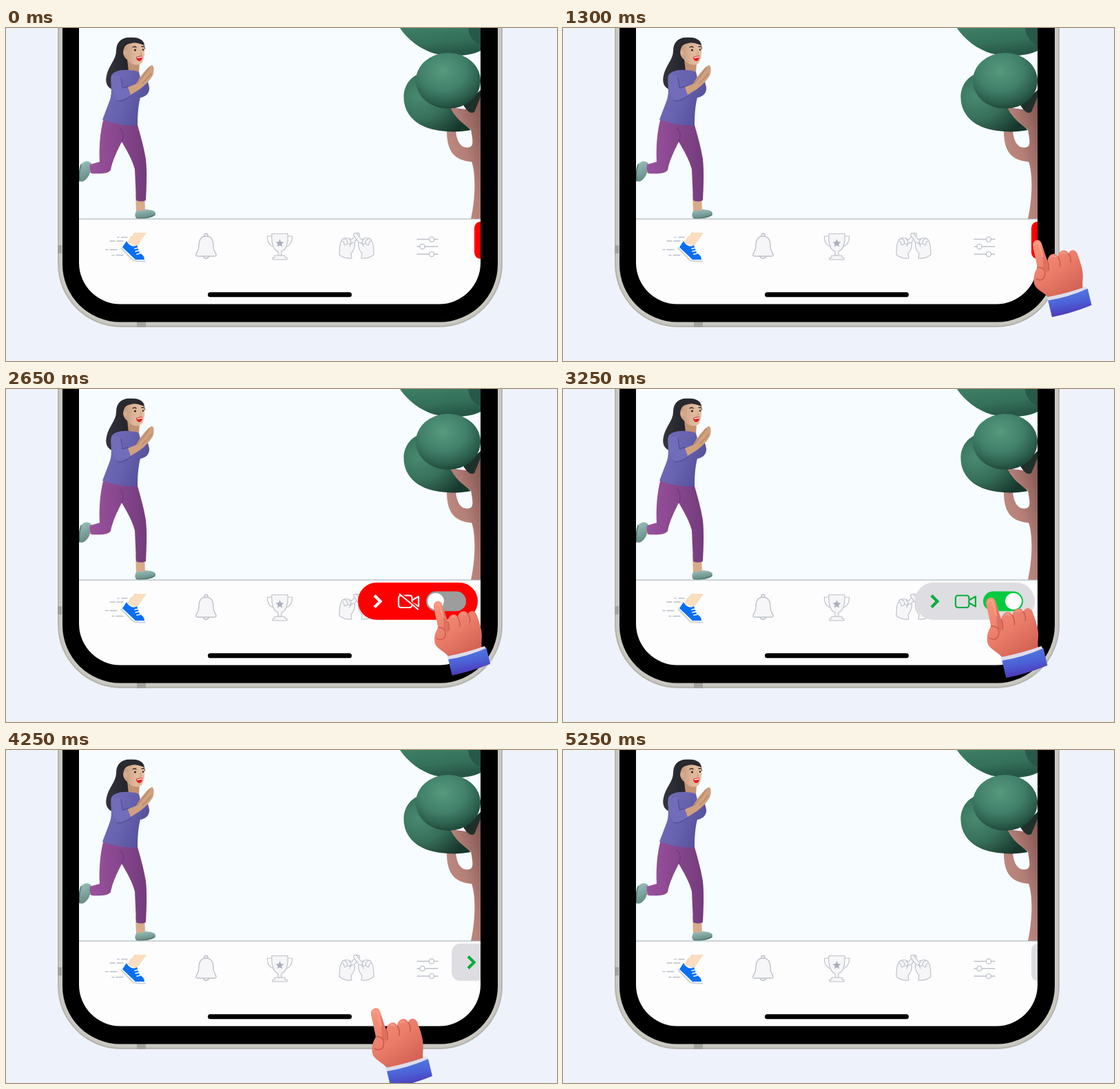
Write an HTML page that moves like this. It is 800 px wide and 483 px high and loops after 5.3 s.

```html
<!DOCTYPE html>
<html lang="en">
<head>
<meta charset="utf-8">
<title>Camera panel</title>
<style>
  html, body { margin: 0; width: 100%; height: 100%; overflow: hidden; background: #eef3fb; }
  svg { display: block; width: 800px; height: 483px; }
  .line { fill: none; stroke-linecap: round; stroke-linejoin: round; }
  .icon { fill: #f6f6f8; stroke: #bfc2ca; stroke-width: 1.4; stroke-linecap: round; stroke-linejoin: round; }
</style>
</head>
<body>
<svg viewBox="0 0 800 483">
  <defs>
    <clipPath id="screen"><path d="M106 0H689V341A60 60 0 0 1 629 400.500H166A60 60 0 0 1 106 341Z"/></clipPath>
    <radialGradient id="leaf" cx=".42" cy=".32" r=".72">
      <stop stop-color="#569a7e"/><stop offset=".5" stop-color="#41806a"/><stop offset=".8" stop-color="#2c5e4c"/><stop offset="1" stop-color="#1b4034"/>
    </radialGradient>
    <radialGradient id="backLeaf" cx=".22" cy=".4" r=".8">
      <stop stop-color="#488a70"/><stop offset=".5" stop-color="#376f5a"/><stop offset="1" stop-color="#17362c"/>
    </radialGradient>
    <linearGradient id="crown" x2=".35" y2="1">
      <stop stop-color="#3f7f66"/><stop offset=".6" stop-color="#34705a"/><stop offset="1" stop-color="#275747"/>
    </linearGradient>
    <linearGradient id="bark" x1="0" x2="1" y1="1" y2="0">
      <stop stop-color="#c6938a"/><stop offset=".55" stop-color="#b47f77"/><stop offset="1" stop-color="#80544f"/>
    </linearGradient>
    <linearGradient id="knit" x2="1" y2=".4">
      <stop stop-color="#736ebb"/><stop offset=".55" stop-color="#6863af"/><stop offset="1" stop-color="#56519c"/>
    </linearGradient>
    <linearGradient id="pants" x2="1">
      <stop stop-color="#9a529f"/><stop offset=".45" stop-color="#8a488f"/><stop offset="1" stop-color="#743c7c"/>
    </linearGradient>
    <linearGradient id="hair" x2="1">
      <stop stop-color="#34343d"/><stop offset=".5" stop-color="#25252c"/><stop offset="1" stop-color="#3c3b45"/>
    </linearGradient>
    <linearGradient id="face" x2="1">
      <stop stop-color="#c2977b"/><stop offset=".5" stop-color="#deb598"/><stop offset="1" stop-color="#e6c2a6"/>
    </linearGradient>
    <linearGradient id="mint" x2=".3" y2="1">
      <stop stop-color="#a0c2bd"/><stop offset="1" stop-color="#668c88"/>
    </linearGradient>
    <linearGradient id="skin" x1=".2" x2=".8" y2="1">
      <stop stop-color="#f6927b"/><stop offset=".5" stop-color="#ea7c69"/><stop offset="1" stop-color="#cf5d50"/>
    </linearGradient>
    <linearGradient id="sleeve" x1=".4" x2=".65" y2="1">
      <stop stop-color="#4f7fe0"/><stop offset=".5" stop-color="#4c5fd6"/><stop offset="1" stop-color="#4c2dae"/>
    </linearGradient>
  </defs>

  <!-- phone body -->
  <rect x="75" y="-200" width="646" height="634" rx="92" fill="#b6b6ae"/>
  <rect x="77" y="-200" width="642" height="631.500" rx="90" fill="#c9c9c1"/>
  <path d="M190 426h13v8h-13zM75 315h6v12h-6z" fill="#a3a39c"/>
  <rect x="82" y="-200" width="632" height="626.500" rx="84" fill="#000"/>

  <g clip-path="url(#screen)">
    <rect x="106" width="583" height="401" fill="#fdfdfe"/>
    <rect x="106" width="583" height="277" fill="#f6fcff"/>

    <!-- tree -->
    <path d="M640 149H653C655 170 664 175 673 173C680 171 677 160 675 147C666 141 655 133 644 115L668 118 689 100V277H675C682 245 682 210 676 194C650 192 640 178 640 149Z" fill="url(#bark)"/>
    <path d="M577.500 101C577 82 590 67 606 65L674 100C664 120 646 112 646 117C655 134 668 141 675 148C660 151 645 151 630 149C598 145 578 127 577.500 101Z" fill="url(#backLeaf)"/>
    <path d="M664 112C670 121 674 125 680 122L689 100V90Z" fill="#1f302a"/>
    <path d="M572 0C583 17 602 31 622 37C650 43 676 40 689 33V0Z" fill="url(#crown)"/>
    <path d="M671 0C672 12 679 21 689 25V0Z" fill="#28584a"/>
    <ellipse cx="642" cy="76.500" rx="47" ry="40.500" fill="url(#leaf)"/>

    <!-- runner -->
    <path d="M188 240 189 267 202 265 201 240Z" fill="#d8ab8b"/>
    <path d="M114 201 124 197 126 209 117 212Z" fill="#c99a7c"/>
    <path d="M109 198C113 192 121 192 124 197C120 203 124 210 119 216C115 222 109 225 107 221C106 214 106 205 109 198Z" fill="url(#mint)"/>
    <path d="M109 198C106 207 106 215 107 222" class="line" stroke="#4e7572" stroke-width="1.500"/>
    <path d="M188 268C190 262 197 267 203 263C209 264 218 264 217 270C215 275 204 277 190 276C187 275 187 271 188 268Z" fill="url(#mint)"/>
    <path d="M190 275.500Q205 277 216 271" class="line" stroke="#557c79" stroke-width="1.500"/>
    <path d="M142 130C136 152 135 176 136 194L122 198C121 202 122 208 124 211C137 212 149 211 152 206C154 193 162 177 168 165C175 177 183 190 187 205L189 250Q196 253 203 250C204 232 205 208 203 190C200 171 194 152 190 137Z" fill="url(#pants)"/>
    <path d="M168 165C172 157 170 149 165 145" class="line" stroke="#6a3275" stroke-width="1.500" opacity=".6"/>
    <path d="M183 14C169 12 160 20 160 33C160 46 149 54 146 69C143 81 149 89 158 90C168 85 178 74 180 58L202 30C201 20 194 14 183 14Z" fill="url(#hair)"/>
    <path d="M176 45 194 50 193 65 178 63Z" fill="#c29172"/>
    <path d="M173 26C178 21 192 20 200 24C202 32 202 43 197 51C191 56 181 53 176 46C170 42 168 34 173 26Z" fill="url(#face)"/>
    <path d="M166 35C169 23 176 19 185 20L201 25C200 17 192 13 181 14C167 15 163 27 164 41Z" fill="#292930"/>
    <ellipse cx="173.500" cy="36" rx="3" ry="4" fill="#d9a98a"/>
    <path d="M184 28q3-2 5 0M197 27l3 0" class="line" stroke="#3a2b28" stroke-width="1.300"/>
    <circle cx="187.500" cy="32" r="1.500" fill="#2a2023"/>
    <circle cx="199" cy="31.500" r="1.300" fill="#2a2023"/>
    <path d="M195 33l2 5-3 0" class="line" stroke="#c99376"/>
    <path d="M189 42Q194 40 198 40Q198 49 193 48Q189 47 189 42Z" fill="#e32127"/>
    <path d="M191 43l6-1" class="line" stroke="#fff" stroke-width="1.500"/>
    <path d="M178 61C166 60 156 63 153 69C151 80 155 92 151 104L140 133C154 138 174 143 191 141C191 127 192 112 195 101C203 100 209 94 208 86L206 78 199 81C195 76 195 70 193 64C188 61 184 62 178 61Z" fill="url(#knit)"/>
    <path d="M153 69C151 80 156 98 161 105C165 109 176 103 182 98L177 85 169 87 166 69Z" fill="#726dba"/>
    <path d="M167 72C168 79 169 83 169 87L177 85M161 105C167 108 176 102 182 98" class="line" stroke="#484488" stroke-width="1.300" opacity=".7"/>
    <path d="M177 86 189 81C194 71 204 58 211 54C216 53 215 65 213 69C208 77 202 83 194 89L181 97Z" fill="#cfa17f"/>
    <path d="M191 80C196 72 203 67 208 57M198 80q8-7 13-14" class="line" stroke="#b08062" stroke-width="1.200"/>

    <!-- tab bar -->
    <path d="M106 277H689" stroke="#9eaab0" stroke-width="1.100"/>
    <path d="M162 303.500h2M168 303.500h8M151 309h7M161 309h9M145 321.500h3M151 321.500h10M154 329.500h3M160 329.500h10" class="line" stroke="#b9c0c9" stroke-width="1.300"/>
    <path d="M187 297H204L190 317 176 311Z" fill="#fbddbf"/>
    <path d="M181 303l8-6h-2l-10 13z" fill="#f0c79f"/>
    <path d="M175 309C178 315 185 319 190 315L194 326Q201 330 201 336L188 336 169 318Z" fill="#096ff2"/>
    <path d="M167.500 319.500 184 336.500Q186 338.500 202 338.500" class="line" stroke="#cbd5df" stroke-width="2.200"/>
    <path d="M187 320l5-1M188 324l5-1M190 328l5-1" class="line" stroke="#fff" stroke-width="1.500"/>

    <g class="icon">
      <path d="M286 331Q290.500 338 295 331"/>
      <circle cx="290.500" cy="301" r="2.700"/>
      <path d="M290.500 302C282 302 280 309 280 316C280 323 277 325 276 328Q275 331 279 331H302Q306 331 305 328C304 325 301 323 301 316C301 309 299 302 290.500 302Z"/>
      <g stroke-width="1.200">
        <path d="M387 302H379.500C379 311 384 317 390 317M408 302H415.500C416 311 411 317 405 317" fill="none"/>
        <path d="M386 298.500H409C410 313 406 323 400 324V330H395V324C389 323 385 313 386 298.500Z"/>
        <path d="M390 330H405V333H408V336H387V333H390Z"/>
        <g id="fist">
          <path d="M484 329C484 321 484 313 487 309C488 304 497 303 502 307L509 298C512 296 514 299 513 301L506 311C508 318 503 325 501 327L502 334Q492 335 484 329Z"/>
          <path d="M488 309q3 1 3 5M492 306q4 1 4 6M498 306q3 2 3 6M491 314q2 2 5-2q2 3 5 0M505 311q-5 1-6 6" fill="none"/>
        </g>
        <use href="#fist" transform="translate(1018) scale(-1 1)"/>
      </g>
      <path d="M597 306.500H627M597 317H627M597 328H627"/>
      <g fill="#fff"><circle cx="618" cy="306.500" r="3.600"/><circle cx="604.500" cy="317" r="3.600"/><circle cx="618" cy="328" r="3.600"/></g>
    </g>
    <path d="M397.500 306l1.700 4 4.300.4-3.300 2.900 1 4.300-3.700-2.300-3.700 2.300 1-4.300-3.300-2.900 4.300-.4z" fill="#a9afbd"/>
    <rect x="293" y="383.200" width="209" height="7" rx="3.500"/>

    <!-- sliding panel -->
    <rect id="panel" y="280.800" height="54"/>
    <g id="controls">
      <g id="glyphs" class="line">
        <path d="M535 299.500 543.500 308 535 316.500" stroke-width="4.200" stroke-linecap="butt" stroke-linejoin="miter"/>
        <rect x="570" y="299.500" width="19.500" height="17.500" rx="3.500" stroke-width="2.200"/>
        <path d="M591 305.500 599 301V315.500L591 311" stroke-width="2.200"/>
      </g>
      <g id="slash" class="line">
        <path d="M573 297 599 319" stroke="#f00" stroke-width="3"/>
        <path d="M571.500 297.500 598 319.500" stroke="#fff" stroke-width="2"/>
      </g>
      <rect id="track" x="610" y="293.500" width="58" height="28.800" rx="14.400"/>
      <circle id="knob" cy="307.800" r="11.900" fill="#fff"/>
    </g>
  </g>

  <g id="hand">
    <path d="M549 312C548 302 559 299 562 307L571 334C573 322 584 320 587 328C588 317 600 315 603 323C606 315 615 317 617 325C622 338 626 352 624.500 362C624 369 624 372 625 376L573 391C569 382 553 378 551 368C549 358 552 351 556 344Z" fill="url(#skin)"/>
    <path d="M563 311 572 340Q573 346 571 352L565 346Z" fill="#c9564a" opacity=".4"/>
    <path d="M571 334Q574 340 573 348M587 328Q591 334 590 342M603 323Q607 329 606 336M556 344C565 343 569 349 567 357C565 364 558 364 554 361" class="line" stroke="#be4b40" stroke-width="1.500" opacity=".75"/>
    <path d="M552 309Q555 304 558 308L564 328M577 328q3-3 6 0M592 323q4-3 6 0" class="line" stroke="#ffb69d" stroke-width="2" opacity=".5"/>
    <path d="M570 389Q601 383 629 373L633 379 573 396Z" fill="#dddced"/>
    <path d="M572 394Q603 389 632 376L638 401Q608 413 578 419Z" fill="url(#sleeve)"/>
  </g>
</svg>
<script>
const LOOP = 5300;
const $ = id => document.getElementById(id);
const ease = u => u * u * (3 - 2 * u);
const ramp = (t, a, b) => ease(Math.min(1, Math.max(0, (t - a) / (b - a))));
const mix = (a, b, u) => a + (b - a) * u;
const blend = (a, b, u) => `rgb(${a.map((v, i) => Math.round(mix(v, b[i], u)))})`;
const set = (id, attrs) => {
  for (const k in attrs) $(id).setAttribute(k, attrs[k]);
};

// time, x shift, y shift, scale
const path = [
  [50, 262, 0, 1], [600, 134, 0, 1], [1100, 130, 0, 1], [1350, 131.5, 3, .955],
  [1450, 131.5, 2, .97], [1900, 0, 0, 1], [2100, 0, 0, 1], [2500, 68.5, 0, 1],
  [2700, 68.5, 1, .91], [2900, 68.5, 0, 1], [3200, 68.5, 0, 1], [3650, -19, 0, 1],
  [3830, -19, 3, .91], [4000, -19, 0, 1], [4600, -19, 190, 1]
];

function pose(t) {
  const i = path.findIndex(k => k[0] > t);
  if (i < 1) return path.at(i < 0 ? -1 : 0).slice(1);
  const a = path[i - 1], b = path[i], u = ramp(t, a[0], b[0]);
  return [1, 2, 3].map(n => mix(a[n], b[n], u));
}

function draw(now) {
  const t = now % LOOP;
  const open = ramp(t, 1450, 1850) - ramp(t, 4000, 4350);
  const on = ramp(t, 2750, 2950);
  const [x, y, s] = pose(t);

  set('panel', {
    x: 680 - 169 * open, width: 18 + 156 * open, rx: 9 + 18 * open,
    fill: blend([255, 0, 0], [221, 221, 226], on)
  });
  set('controls', { transform: `translate(${169 * (1 - open)})` });
  set('glyphs', { stroke: blend([255, 255, 255], [8, 174, 58], on) });
  set('slash', { opacity: on < .5 ? 1 : 0 });
  set('track', { fill: blend([157, 157, 157], [4, 202, 64], on) });
  set('knob', { cx: 624 + 30 * on });
  set('hand', { transform: `translate(${593.5 + x} ${360.5 + y}) scale(${s}) translate(-593.5 -360.5)` });
}

const start = performance.now();
function tick() {
  draw(performance.now() - start);
  requestAnimationFrame(tick);
}
tick();
</script>
</body>
</html>
```
